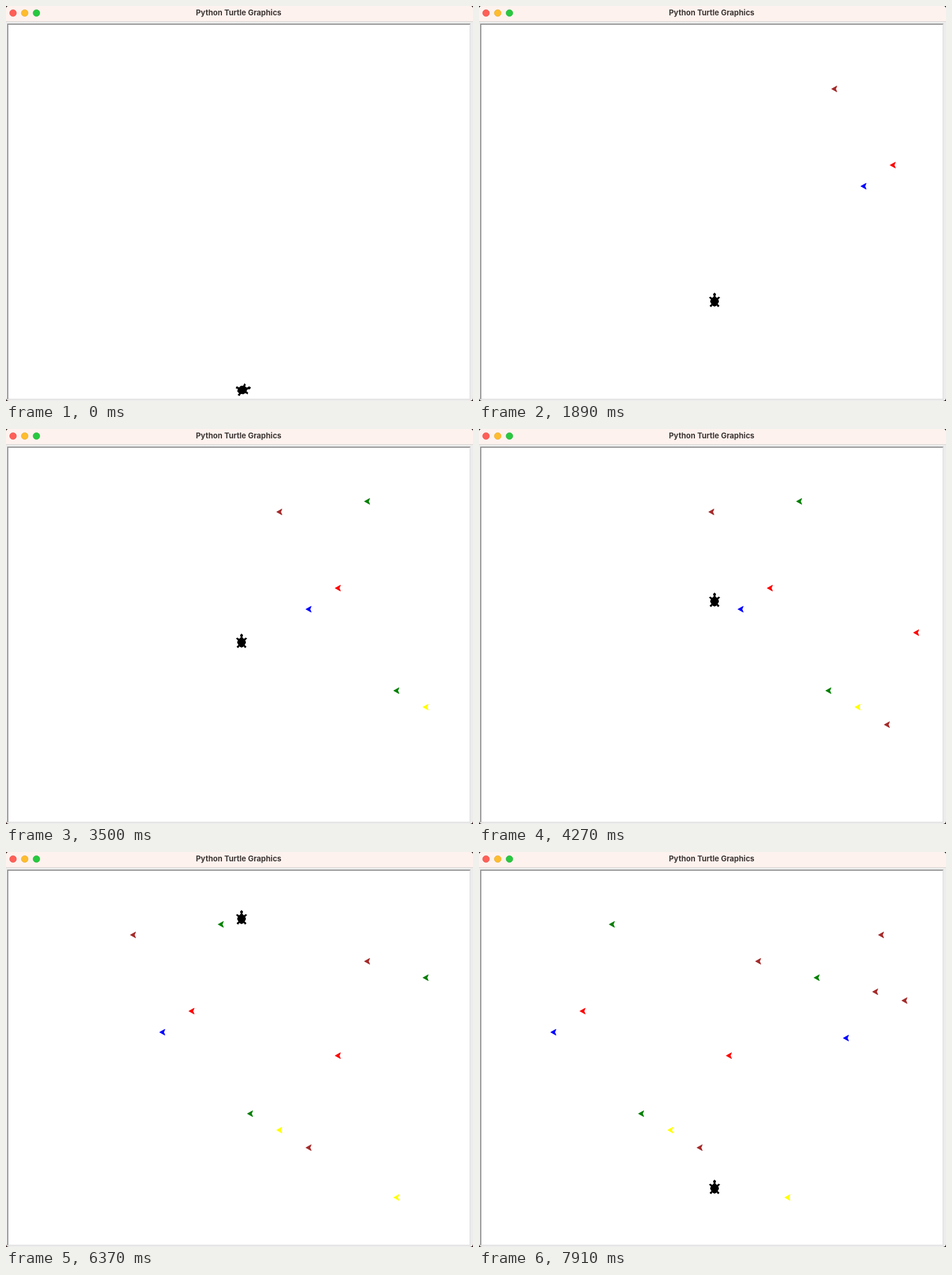
Animation, 798 px wide and 674 px high, one loop 8000 ms. Source, as an HTML page:

```html
<!DOCTYPE html>
<html lang="en">
<head>
<meta charset="utf-8">
<title>Python Turtle Graphics</title>
<style>
  html, body { margin: 0; width: 100%; height: 100%; overflow: hidden; background: #2a1512; }
  svg { display: block; width: 798px; height: 674px; }
  text { font: 700 13px Inter, Roboto, sans-serif; fill: #3d3735; text-anchor: middle; }
</style>
</head>
<body>
<svg viewBox="0 0 798 674">
  <rect width="798" height="674" rx="5" fill="#ececec"/>
  <path d="M0 26V5q0-5 5-5H793q5 0 5 5V26z" fill="#fdf2ee"/>
  <path d="M0 26.5H798" stroke="#d8d3d1"/>
  <g stroke-width=".6">
    <circle cx="12" cy="12" r="5.8" fill="#ff5f57" stroke="#e0443e"/>
    <circle cx="32" cy="12" r="5.8" fill="#febc2e" stroke="#dea123"/>
    <circle cx="52" cy="12" r="5.8" fill="#28c840" stroke="#1aab29"/>
  </g>
  <text x="397.5" y="16">Python Turtle Graphics</text>
  <rect x="2" y="30" width="792" height="642" fill="#e4e4e4"/>
  <path d="M2 672V30H794L792 32H4V670z" fill="#929292"/>
  <rect x="4" y="32" width="788" height="638" fill="#fff"/>
  <g id="cars"></g>
  <path id="turtle" stroke="#000" d="M0-16 2-14 1-10 4-7 7-9 9-8 6-5 7-1 5 3 8 6 6 8 4 5 0 7-4 5-6 8-8 6-5 3-7-1-6-5-9-8-7-9-4-7-1-10-2-14z"/>
</svg>
<script>
const LOOP = 8000, TICK = 70, LAST = 7910;   // ms
const STEP = 113, START = 168;               // ms per game step, end of the opening turn
const SPEED = 10, SPAWN_EVERY = 5;
const SPAWN_X = 742.5, EXIT_X = 92.5, WRAP = 610;

// One car every five steps: colour and lane
const lanes = [
  ['brown', 141], ['blue', 307], ['red', 271], ['green', 123], ['green', 446],
  ['yellow', 474], ['brown', 504], ['red', 347], ['brown', 186], ['yellow', 589],
  ['green', 214], ['blue', 317], ['brown', 238], ['brown', 253]
];

const turtle = document.getElementById('turtle');
const group = document.getElementById('cars');

const cars = lanes.map(([color, y], i) => {
  const el = document.createElementNS('http://www.w3.org/2000/svg', 'path');
  el.setAttribute('d', 'M0 0 9-5 7 0 9 5z');
  el.setAttribute('fill', color);
  el.setAttribute('stroke', color);
  group.append(el);
  return { el, y: y + 0.5, born: 1 + i * SPAWN_EVERY };
});

function draw(time) {
  const t = Math.min(Math.floor(time / TICK) * TICK, LAST);
  const step = Math.max(0, Math.floor((t - START) / STEP));

  const turn = Math.min(11, 2 + Math.floor(t / 17)) * 90 / 11;
  const y = 655.5 - SPEED * (step % 60);
  turtle.setAttribute('transform', `translate(402.5 ${y}) rotate(${90 - turn})`);

  for (const car of cars) {
    let x = SPAWN_X - SPEED * (step - car.born);
    if (x < EXIT_X) x += WRAP;
    car.el.setAttribute('visibility', step < car.born ? 'hidden' : 'visible');
    car.el.setAttribute('transform', `translate(${x} ${car.y})`);
  }
}

const begin = performance.now();
function frame() {
  draw((performance.now() - begin) % LOOP);
  requestAnimationFrame(frame);
}
frame();
</script>
</body>
</html>
```
